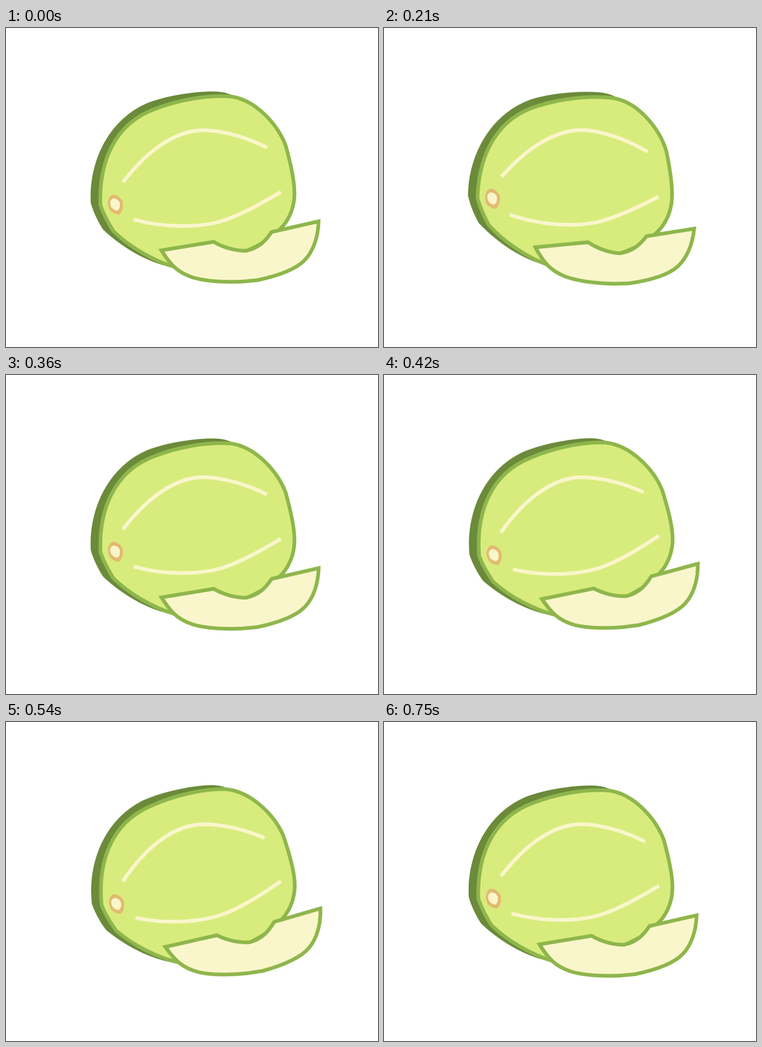
Write an HTML page that moves like this. It is 808 px wide and 693 px high and loops after 820 ms.

```html
<!DOCTYPE html>
<html lang="en">
<head>
<meta charset="utf-8">
<title>Melon</title>
<style>
  html, body { margin: 0; width: 100%; height: 100%; overflow: hidden; background: #fff; }
  svg { display: block; width: 808px; height: 693px; }
  #melon { transform-origin: 434px 347px; }
  .shade { fill: #6b8a3a; }
  .rind { stroke: #8eb64c; stroke-width: 8; stroke-miterlimit: 10; }
  .skin { fill: #d8ec7d; }
  .flesh { fill: #faf6cb; }
  .stripe { fill: none; stroke: #faf6cb; stroke-width: 8; }
  .stem { fill: #e3ba70; }
</style>
</head>
<body>
<svg viewBox="0 0 808 693">
  <g id="melon">
    <path class="shade" d="M184 380C180 290 222 200 307 163C350 146 415 137 455 138C475 139 486 143 495 148L400 300L365 520C318 514 256 481 211 438C200 421 190 401 184 380Z"/>
    <path class="skin rind" d="M205 384C202 296 232 208 326 175C370 158 437 144 490 149C543 157 591 210 608 257C617 290 626.5 330 626.5 358C627 384 618 412 600 432C580 455 555 471 520 485C470 515 420 530 366 519C320 506 266 474 233 441C222 423 211 404 205 384Z"/>
    <path class="stripe" d="M254 335C300 275 362 222 430 222C478 223 530 241 567 260"/>
    <path class="stripe" d="M277 416C350 436 420 432.5 465 420.5C505 409 550 384 597 356"/>
    <path class="stem" d="M229 363Q234 361.500 239 363Q248 367 253 376Q255 384 253 393Q251 401 246 405Q242 406 238 404Q230 401 225 395Q221 386 221 378Q223 368 229 363Z"/>
    <path class="flesh" d="M231 371Q235 369.500 238 371Q244 373 247 379Q248 385 247 389Q246 394 242 396.500Q239 397 236 395Q230 392 228 388Q226 383 226 378Q227 374 231 371Z"/>
    <path class="flesh rind" d="M337.500 483L451 464.500C474 478 500 484 521 484C550 478 564 462 577 443L679 420C678 455 667 485 649 504C628 526 588 539 545 548C495 554 440 552 406 542C372 531 357 514 337.500 483Z"/>
  </g>
</svg>
<script>
  const LOOP = 820;
  // [time in ms, angle in degrees, steps until the next pose]
  const poses = [
    [0, 0, 8],
    [240, 4.3, 8],
    [480, -4.5, 9],
    [750, 0, 1],
    [LOOP, 0, 1]
  ];
  const frames = poses.map(([time, angle, steps]) => ({
    offset: time / LOOP,
    transform: `rotate(${angle}deg)`,
    easing: `steps(${steps}, end)`
  }));
  document.getElementById("melon").animate(frames, { duration: LOOP, iterations: Infinity });
</script>
</body>
</html>
```
